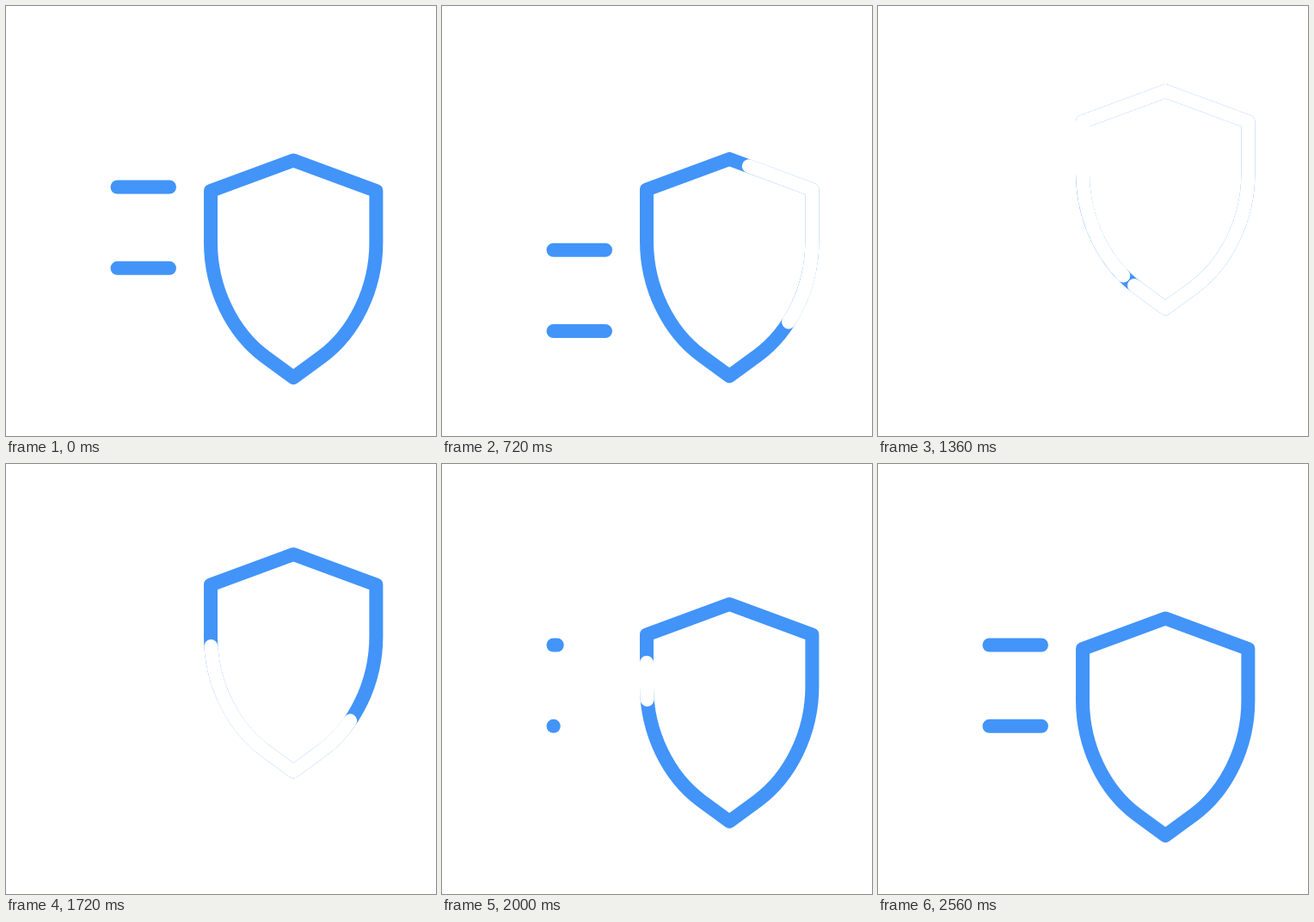
Animation of 500 by 500 pixels, one loop 3000 ms. Source, as an HTML page:

```html
<!DOCTYPE html>
<html lang="en">
<head>
<meta charset="utf-8">
<title>Shield</title>
<style>
  html, body { margin: 0; width: 100%; height: 100%; overflow: hidden; background: #fff; }
  svg { display: block; width: 100vw; height: 100vh; }
  path { fill: none; stroke: #4294f9; stroke-width: 16; stroke-linecap: round; stroke-linejoin: round; }
  #wipe { stroke: #fff; }
</style>
</head>
<body>
<svg viewBox="0 0 500 500">
  <path id="top"/>
  <path id="low"/>
  <g id="shield">
    <path id="line"/>
    <path id="wipe" pathLength="1"/>
  </g>
</svg>
<script>
const LOOP = 3000, STEP = 40, TRAVEL = 82, BAR = 60.5, TURN = 300 / 360;
const el = id => document.getElementById(id);

const outline = 'M334.2 179.5L430.4 215V275C430.4 329 405 380 367 408' +
  'L334.2 432L301.4 408C263.4 380 238 329 238 275V215Z';
el('line').setAttribute('d', outline);
el('wipe').setAttribute('d', outline);

// Progress 0..1 between two times, eased like cubic-bezier(.6, 0, .2, 1).
function ease(t, from, to) {
  const x = Math.min(1, Math.max(0, (t - from) / (to - from)));
  if (x === 0 || x === 1) return x;
  let lo = 0, hi = 1;
  for (let i = 0; i < 24; i++) {
    const s = (lo + hi) / 2, r = 1 - s;
    if (1.8 * r * r * s + .6 * r * s * s + s * s * s < x) lo = s;
    else hi = s;
  }
  return lo * lo * (3 - 2 * lo);
}

function drawBar(bar, y, size) {
  bar.style.display = size > 0 ? '' : 'none';
  bar.setAttribute('d', `M129.5 ${y}h${BAR * size}`);
}

// White stroke trimmed to part of the outline, turning as it grows and shrinks.
function drawWipe(t) {
  const wipe = el('wipe');
  const tail = ease(t, 1200, 2320), head = ease(t, 360, 1320);
  const size = head - tail, offset = TURN * ease(t, 350, 2425);
  wipe.style.display = size > .001 ? '' : 'none';
  wipe.setAttribute('stroke-dasharray', `${size} ${1 - size}`);
  wipe.setAttribute('stroke-dashoffset', -(tail + offset));
}

function draw(t) {
  const lift = TRAVEL * (ease(t, 600, 1520) - ease(t, 1500, 2400));
  el('shield').setAttribute('transform', `translate(0 ${-lift})`);
  drawWipe(t);

  const leaving = t < LOOP / 2;
  const drop = leaving ? TRAVEL * ease(t, 360, 920) : 0;
  const left = 1 - ease(t, 720, 920);
  drawBar(el('top'), 210.5 + drop, leaving ? left : ease(t, 1880, 2420));
  drawBar(el('low'), 304.8 + drop, leaving ? left : ease(t, 1960, 2560));
}

const begin = performance.now();
function tick() {
  const t = (performance.now() - begin) % LOOP;
  draw(Math.floor(t / STEP) * STEP);
  requestAnimationFrame(tick);
}
tick();
</script>
</body>
</html>
```
